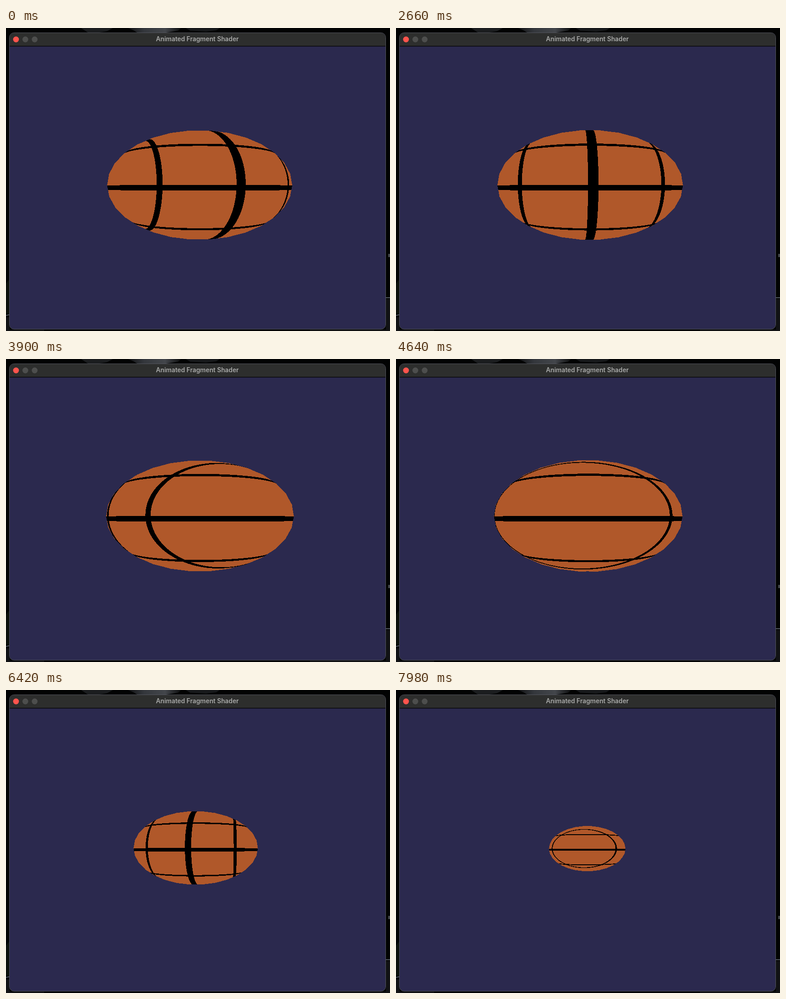
Recreate the animation shown at these times as an HTML page with a canvas. Size 844 by 664 pixels, loop 8000 ms.

```html
<!DOCTYPE html>
<html lang="en">
<head>
<meta charset="utf-8">
<title>Animated Fragment Shader</title>
<style>
  html, body { margin: 0; width: 100%; height: 100%; overflow: hidden; background: #000; }
  svg, canvas { position: absolute; left: 0; top: 0; display: block; }
  text { font: 600 13.8px Inter, Roboto, sans-serif; fill: #a8a9a8; text-anchor: middle; }
</style>
</head>
<body>
<svg width="844" height="664" viewBox="0 0 844 664">
  <defs>
    <linearGradient id="sky">
      <stop offset="0" stop-color="#111214"/>
      <stop offset=".3" stop-color="#34373c"/>
      <stop offset=".7" stop-color="#43464b"/>
      <stop offset="1" stop-color="#0c0d0e"/>
    </linearGradient>
    <clipPath id="frame"><rect x="8" y="11" width="826" height="649" rx="10"/></clipPath>
  </defs>
  <!-- desktop edges around the window -->
  <rect width="844" height="664" fill="#020303"/>
  <path d="M165 0H235L222 7 205 10H180Z" fill="#1b1d1f"/>
  <path d="M268 0H385L378 6 345 11H290L280 5Z" fill="url(#sky)"/>
  <path d="M395 0H470L462 5 440 8 405 6Z" fill="#17191b"/>
  <path d="M0 560L8 550V626H0Z" fill="#0d110b"/>
  <path d="M0 630L8 628M835 591H844" stroke="#50565f" stroke-width="2"/>
  <path d="M840 495h4v7h-4z" fill="#42454a"/>
  <path d="M0 634H8V664H0ZM0 661H84V664H0ZM668 661H844V664H668ZM835 594H844V664H835Z" fill="#111214"/>
  <!-- window -->
  <g clip-path="url(#frame)">
    <rect x="8" y="11" width="826" height="649" fill="#2b294e"/>
    <rect x="8" y="11" width="826" height="28" fill="#2d2e2d"/>
    <rect x="8" y="39" width="826" height="1.5" fill="#080808"/>
  </g>
  <rect x="7.5" y="10.5" width="827" height="649.5" rx="10" fill="none" stroke="#53545c"/>
  <circle cx="22" cy="25" r="6.4" fill="#ff544d"/>
  <circle cx="42.5" cy="25" r="6.4" fill="#4d4e4d"/>
  <circle cx="63" cy="25" r="6.4" fill="#4d4e4d"/>
  <text x="420.5" y="29">Animated Fragment Shader</text>
</svg>
<canvas id="view" width="844" height="664"></canvas>
<script>
const ctx = document.getElementById('view').getContext('2d');
const LOOP = 8000;
const AXIS = { x: 421, y: 350 };
const FOCAL = { x: 574.5, y: 339 };
const AREA = { x: 200, y: 210, w: 440, h: 270 };
const SEAM = 0.6, THICK = 0.04, THIN = 0.02;
const FACET = Math.PI / 15;
const TURN = [[0, 0.354], [49.5, 0.354], [68, -0.41], [100, -1.743],
              [124, -2.708], [137, -3.262], [171, -4.848]];

const image = ctx.createImageData(AREA.w, AREA.h);
const pixels = new Uint32Array(image.data.buffer);
const ORANGE = 0xff2a58b0, BLACK = 0xff000000;

// Steps last 20, 100 and 20 ms in turn.
function stepAt(ms) {
  const rest = ms % 140;
  return 3 * Math.floor(ms / 140) + (rest < 20 ? 0 : rest < 120 ? 1 : 2);
}

function interpolate(knots, at) {
  const i = Math.max(1, knots.findIndex(k => k[0] >= at));
  const [a, from] = knots[i - 1], [b, to] = knots[i];
  return from + (to - from) * (at - a) / (b - a);
}

function distanceAt(step) {
  const m = Math.max(0, step - 124);
  return 2.975 + 0.1124 * m - 0.000625 * m * m;
}

function isSeam(x, y) {
  return Math.abs(y) < 0.037 || Math.abs(x) < THICK ||
         Math.abs(Math.abs(y) - SEAM) < 0.019 || Math.abs(Math.abs(x) - SEAM) < THIN;
}

function draw(step) {
  const angle = interpolate(TURN, step), dist = distanceAt(step);
  const sin = Math.sin(angle), cos = Math.cos(angle);
  // The mesh sits slightly off its turning axis.
  const lean = angle + 1.981;
  const cx = 0.03 * Math.sin(lean), cy = 0.047, cz = dist - 0.03 * Math.cos(lean);
  const outside = cx * cx + cy * cy + cz * cz - 1;
  pixels.fill(0);

  for (let row = 0; row < AREA.h; row++) {
    const dy = (AXIS.y - AREA.y - row - 0.5) / FOCAL.y;
    for (let col = 0; col < AREA.w; col++) {
      const dx = (AREA.x + col + 0.5 - AXIS.x) / FOCAL.x;
      const len = dx * dx + dy * dy + 1;
      const dot = dx * cx + dy * cy + cz;
      const disc = dot * dot - len * outside;
      if (disc < 0) continue;

      // Flat facets cut the outline into a polygon.
      const miss = Math.sqrt(Math.max(0, 1 - disc / len));
      if (miss > 0.99) {
        const around = Math.atan2(dy - cy / cz, dx - cx / cz) + 2 * Math.PI;
        if (miss > Math.cos(FACET / 2) / Math.cos(around % FACET - FACET / 2)) continue;
      }

      const t = (dot - Math.sqrt(disc)) / len;
      const across = t * dx * cos - (dist - t) * sin;
      pixels[row * AREA.w + col] = isSeam(across, t * dy) ? BLACK : ORANGE;
    }
  }
  ctx.putImageData(image, AREA.x, AREA.y);
}

let shown = -1;
const start = performance.now();
function tick() {
  const step = stepAt((performance.now() - start) % LOOP);
  if (step !== shown) draw(shown = step);
  requestAnimationFrame(tick);
}
tick();
</script>
</body>
</html>
```
